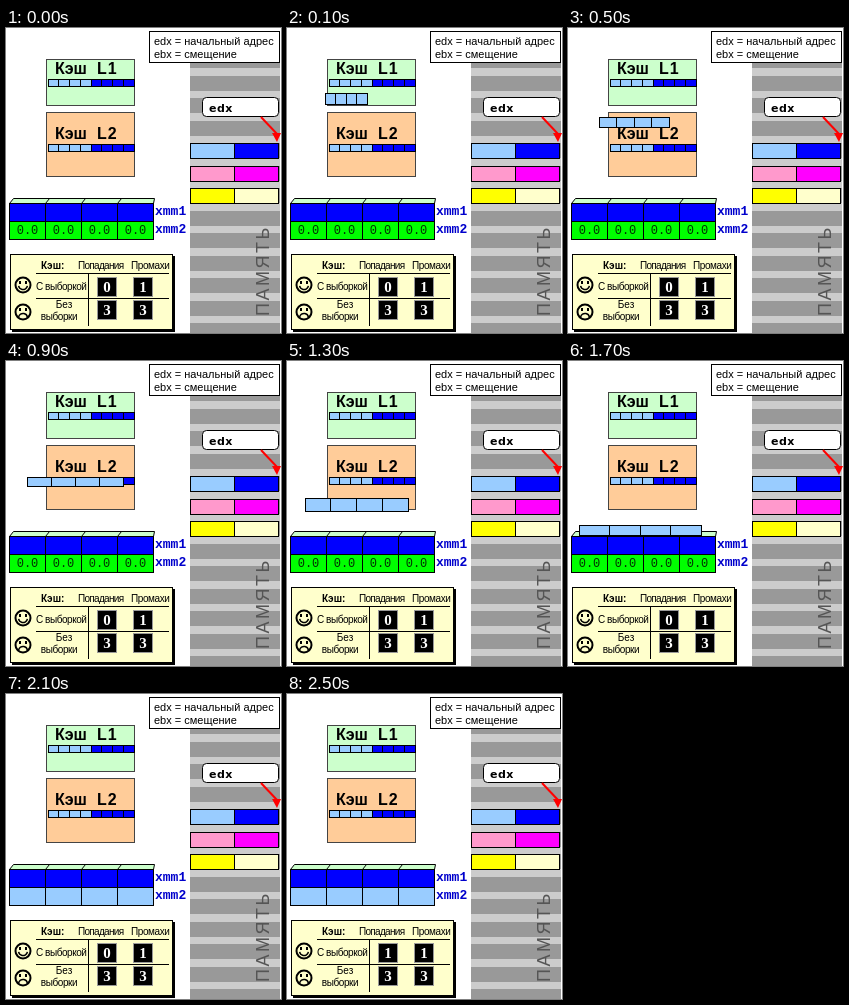
An HTML page with a canvas for the animation above (3.5 s loop, 275 px wide and 305 px high).

```html
<!DOCTYPE html>
<html lang="ru">
<head>
<meta charset="utf-8">
<style>
html, body { margin: 0; width: 100%; height: 100%; overflow: hidden; background: #fff; }
canvas { display: block; }
</style>
</head>
<body>
<canvas id="stage" width="275" height="305"></canvas>
<script>
const ctx = document.getElementById('stage').getContext('2d');
const LOOP = 3500;
const SKY = '#99ccff', BLUE = '#0000ff', GREEN = '#00ff00';
const SANS = '"Liberation Sans", sans-serif';
const WIDE = '"DejaVu Sans", sans-serif';
const MONO = '"Liberation Mono", monospace';
const SERIF = '"Liberation Serif", serif';

// Position of the travelling strip: start time, left, top, width, height.
const steps = [
  [100, 38, 65, 42, 11],
  [500, 31, 89, 70, 10],
  [900, 21, 116, 96, 9],
  [1300, 18, 137, 103, 13],
  [1700, 11, 164, 122, 10]
];
const LOADED = 2100, COUNTED = 2500;

function fill(x, y, w, h, color) {
  ctx.fillStyle = color;
  ctx.fillRect(x, y, w, h);
}

function box(x, y, w, h, color, line = '#000') {
  fill(x, y, w + 1, h + 1, line);
  fill(x + 1, y + 1, w - 1, h - 1, color);
}

function cells(x, y, w, h, colors) {
  const edge = i => Math.floor(x + w * i / colors.length);
  colors.forEach((color, i) => box(edge(i), y, edge(i + 1) - edge(i), h, color));
}

function text(str, x, y, font, color = '#000', align = 'left', spacing = 0) {
  ctx.font = font;
  ctx.fillStyle = color;
  ctx.textAlign = align;
  ctx.letterSpacing = spacing + 'px';
  ctx.fillText(str, x, y);
}

function polygon(points, color, outline) {
  ctx.beginPath();
  points.forEach(([x, y]) => ctx.lineTo(x, y));
  ctx.closePath();
  ctx.fillStyle = color;
  ctx.fill();
  if (outline) {
    ctx.strokeStyle = outline;
    ctx.lineWidth = 1;
    ctx.stroke();
  }
}

function line(x1, y1, x2, y2, color = '#000', width = 1) {
  ctx.beginPath();
  ctx.moveTo(x1, y1);
  ctx.lineTo(x2, y2);
  ctx.strokeStyle = color;
  ctx.lineWidth = width;
  ctx.stroke();
}

function cache(name, y, h, baseline, barY, color) {
  box(40, y, 88, h, color, '#444');
  text('Кэш', 49, baseline, `bold 16px ${SANS}`);
  text(name, 91, baseline, `bold 16px ${SANS}`, '#000', 'left', 1);
  cells(42, barY, 86, 7, [...Array(4).fill(SKY), ...Array(4).fill(BLUE)]);
}

function memory() {
  const rowTop = i => Math.round(115 + 22.5 * i);
  fill(184, 34, 90, 271, '#cccccc');
  for (let i = -4; i < 9; i++) fill(184, rowTop(i), 90, 15, '#999999');
  [[SKY, BLUE], ['#ff99cc', '#ff00ff'], ['#ffff00', '#ffffcc']]
    .forEach((pair, i) => cells(184, rowTop(i), 88, 15, pair));

  ctx.save();
  ctx.translate(263, 288);
  ctx.rotate(-Math.PI / 2);
  text('ПАМЯТЬ', 0, 0, `18px ${SANS}`, '#555', 'left', 2.5);
  ctx.restore();

  fill(143, 0, 132, 34, '#fff');
  box(143, 3, 130, 31, '#fff');
  text('edx = начальный адрес', 148, 17, `11px ${SANS}`);
  text('ebx = смещение', 148, 30, `11px ${SANS}`);

  ctx.beginPath();
  ctx.roundRect(196.5, 69.5, 76, 19, 4);
  ctx.fillStyle = '#fff';
  ctx.fill();
  ctx.strokeStyle = '#000';
  ctx.lineWidth = 1;
  ctx.stroke();
  text('edx', 203, 84, `bold 11px ${WIDE}`, '#000', 'left', 0.5);
  line(255, 89, 271, 106, '#ff0000', 2);
  polygon([[271, 114], [266, 105], [275, 105]], '#ff0000');
}

function registers(loaded) {
  polygon([[3.5, 175.5], [7.5, 170.5], [148.5, 170.5], [147.5, 175.5]], '#ccffcc', '#000');
  for (let x = 39.5; x < 147; x += 36) line(x, 175.5, x + 4, 170.5);
  cells(3, 175, 144, 18, Array(4).fill(BLUE));
  cells(3, 193, 144, 18, Array(4).fill(loaded ? SKY : GREEN));
  if (!loaded) {
    for (let i = 0; i < 4; i++) {
      text('0.0', 21.5 + 36 * i, 206, `12px ${MONO}`, '#003300', 'center');
    }
  }
  text('xmm1', 149, 187, `bold 13px ${MONO}`, '#0000cc');
  text('xmm2', 149, 205, `bold 13px ${MONO}`, '#0000cc');
}

function face(y, happy) {
  ctx.strokeStyle = '#000';
  ctx.lineWidth = 2;
  ctx.beginPath();
  ctx.arc(17, y, 7.5, 0, 2 * Math.PI);
  ctx.stroke();
  ctx.beginPath();
  if (happy) ctx.arc(17, y, 4.5, 0.2, Math.PI - 0.2);
  else ctx.arc(17, y + 6, 4.5, Math.PI + 0.2, -0.2);
  ctx.lineWidth = 1.5;
  ctx.stroke();
  fill(13, y - 4, 2, 3, '#000');
  fill(19, y - 4, 2, 3, '#000');
}

function counter(x, y, value) {
  box(x, y, 19, 19, '#000', '#999');
  text(value, x + 10, y + 15, `bold 15px ${SERIF}`, '#fff', 'center');
}

function scoreboard(hits) {
  fill(6, 228, 163, 76, '#000');
  box(4, 226, 162, 75, '#ffffcc');
  line(30, 245.5, 163, 245.5);
  line(30, 270.5, 163, 270.5);
  line(82.5, 245, 82.5, 298);
  text('Кэш:', 35, 241, `bold 10px ${SANS}`);
  text('Попадания', 72, 241, `10px ${SANS}`, '#000', 'left', -0.7);
  text('Промахи', 125, 241, `10px ${SANS}`, '#000', 'left', -0.4);
  text('С выборкой', 30, 262, `10px ${SANS}`, '#000', 'left', -0.45);
  text('Без', 58, 280, `10px ${SANS}`, '#000', 'center');
  text('выборки', 53, 292, `10px ${SANS}`, '#000', 'center', -0.4);
  face(257, true);
  face(284, false);
  counter(91, 249, hits);
  counter(127, 249, 1);
  counter(91, 272, 3);
  counter(127, 272, 3);
}

function draw(t) {
  fill(0, 0, 275, 305, '#fff');
  cache('L1', 31, 46, 46, 51, '#ccffcc');
  cache('L2', 84, 64, 111, 116, '#ffcc99');
  memory();
  registers(t >= LOADED);
  scoreboard(t >= COUNTED ? 1 : 0);
  const step = steps.filter(([start]) => start <= t).pop();
  if (step && t < LOADED) {
    const [, x, y, w, h] = step;
    cells(x, y, w, h, Array(4).fill(SKY));
  }
}

const start = performance.now();
function tick() {
  draw((performance.now() - start) % LOOP);
  requestAnimationFrame(tick);
}
tick();
</script>
</body>
</html>
```
